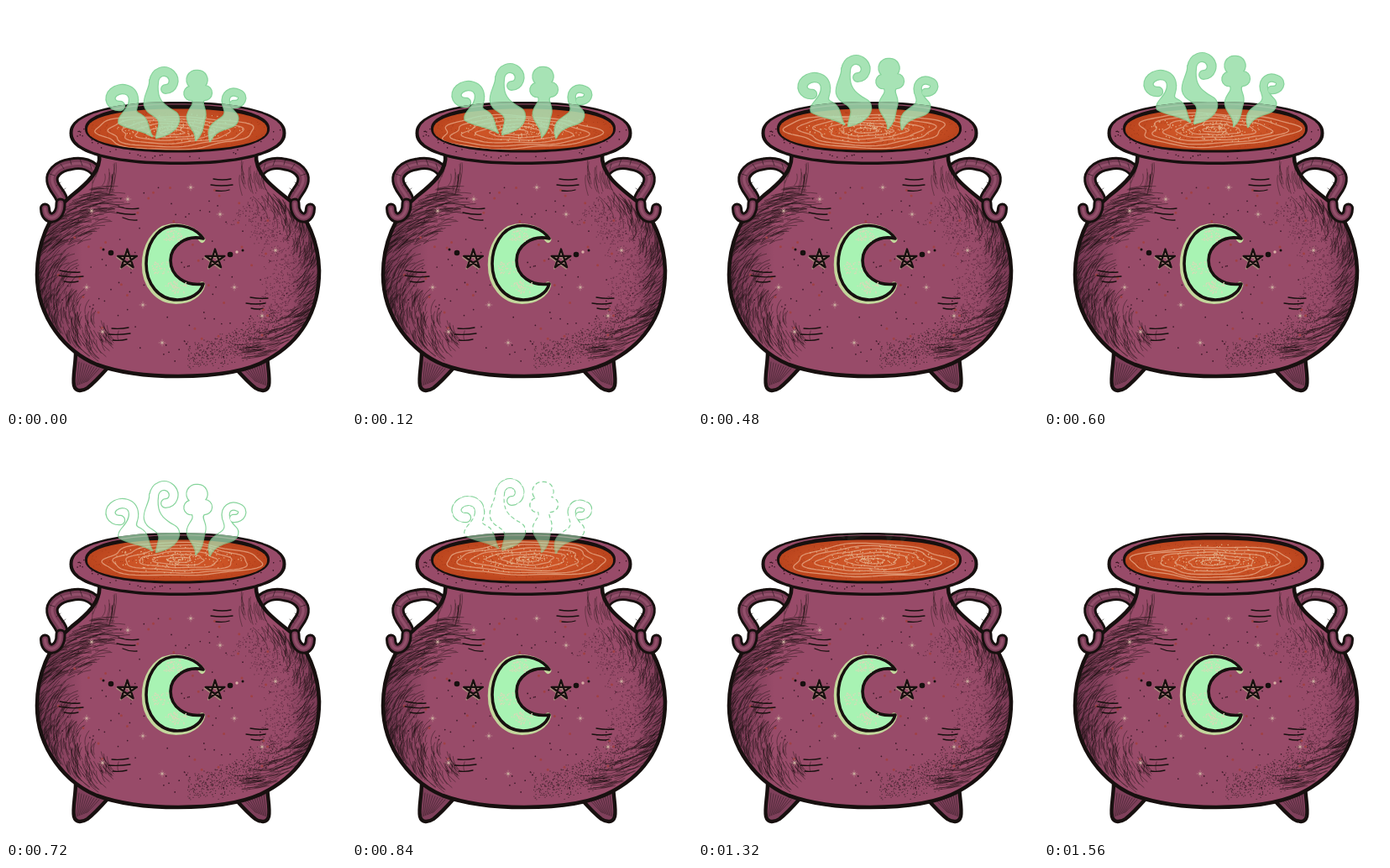
These frames come from a looping animation (405x480 px, 1680 ms). An HTML page:

```html
<!DOCTYPE html>
<html lang="en">
<head>
<meta charset="utf-8">
<title>Cauldron</title>
<style>
html, body { margin: 0; width: 100%; height: 100%; overflow: hidden; background: #fff; }
svg { display: block; width: 100vw; height: 100vh; }
path { stroke-linecap: round; stroke-linejoin: round; }
</style>
</head>
<body>
<svg id="stage" viewBox="0 0 405 480" xmlns="http://www.w3.org/2000/svg">
  <defs>
    <linearGradient id="shade" gradientUnits="userSpaceOnUse" x1="37" y1="0" x2="373" y2="0">
      <stop offset="0" stop-color="#4a2036" stop-opacity=".5"/>
      <stop offset=".16" stop-color="#4a2036" stop-opacity="0"/>
      <stop offset=".88" stop-color="#4a2036" stop-opacity="0"/>
      <stop offset="1" stop-color="#4a2036" stop-opacity=".4"/>
    </linearGradient>
    <radialGradient id="soupFill">
      <stop offset=".5" stop-color="#cd5426"/>
      <stop offset="1" stop-color="#bb451e"/>
    </radialGradient>
    <clipPath id="bodyClip"><path id="bodyCut"/></clipPath>
    <clipPath id="rimClip"><path id="rimCut"/></clipPath>
    <clipPath id="soupClip"><path id="soupCut"/></clipPath>
  </defs>
  <g id="airSteam"></g>
  <g id="pot"></g>
  <g id="soup" clip-path="url(#soupClip)"></g>
  <g clip-path="url(#rimClip)"><g id="potSteam"></g></g>
</svg>
<script>
const LOOP = 1680, STEP = 120, TAU = Math.PI * 2;
const INK = '#17100f', MAUVE = '#984b69';
const $ = id => document.getElementById(id);

let seed = 41;
const rnd = (a = 0, b = 1) => {
  seed = (seed * 16807) % 2147483647;
  return a + (b - a) * seed / 2147483647;
};
const times = (n, fn) => Array.from({ length: n }, (_, i) => fn(i)).join('');
const rad = deg => deg * Math.PI / 180;
const f = n => n.toFixed(1);
const dot = (x, y) => `M${f(x)} ${f(y)}h.01`;

function add(parent, d, attrs = {}) {
  const el = document.createElementNS('http://www.w3.org/2000/svg', 'path');
  el.setAttribute('d', d);
  for (const key in attrs) el.setAttribute(key, attrs[key]);
  parent.appendChild(el);
  return el;
}
const line = (parent, d, stroke, width, more) =>
  add(parent, d, { fill: 'none', stroke, 'stroke-width': width, ...more });

function superEllipse(cx, cy, a, b, n) {
  const pow = v => Math.sign(v) * Math.abs(v) ** (2 / n);
  return times(120, i => {
    const t = i / 120 * TAU;
    return `${i ? 'L' : 'M'}${f(cx + a * pow(Math.cos(t)))} ${f(cy + b * pow(Math.sin(t)))}`;
  }) + 'Z';
}

// ---- pot ----
const pot = $('pot');
const BODY = 'M111 176C114 196 96 212 78 226C50 248 37 285 37 320C37 372 72 412 108 427' +
  'C135 437 170 441 205 441C245 441 285 437 312 421C350 400 373 365 373 315' +
  'C372 280 358 250 340 233C318 216 296 200 298 176Z';
const MIRROR = { transform: 'matrix(-1 0 0 1 409 0)' };
const onBody = (deg, r) => [205 + 168 * r * Math.cos(rad(deg)), 318 + 122 * r * Math.sin(rad(deg))];

function tube(d, width, more) {
  line(pot, d, INK, width, more);
  line(pot, d, '#793c56', width - 6, more);
  line(pot, d, '#9c5873', 3.2, { 'stroke-opacity': .7, ...more });
}

function drawHandle(more) {
  tube('M112 204C104 187 88 186 77 188.5C60 191 54 201 55 208C56 219 68 224 68 238', 15.5, more);
  line(pot, 'M88 182l3 8M76 182l2 7M65 188l4 6M60 214l5 -4M66 221l5 -4M52 200l6 2M100 188l2 6', INK, .9,
    { 'stroke-opacity': .6, ...more });
}

function drawFoot(more) {
  add(pot, 'M83 412C83 428 79 442 81 452C83 460 91 459 97 455C106 448 114 439 122 430Z',
    { fill: '#7f405b', stroke: INK, 'stroke-width': 4.4, ...more });
  line(pot, times(9, i => `M${84 + i * 1.6} ${452 - i * .6}L${87 + i * 3} ${424 + i}`), INK, .7,
    { 'stroke-opacity': .6, ...more });
}

// short strokes along the edge, thinning out inwards
const hatch = (from, to, count, reach) => times(count, () => {
  const a = rnd(from, to), r = 1.03 - reach * rnd() ** 1.5, turn = rnd(4, 11), dip = rnd(.03, .09);
  const [x, y] = onBody(a, r), [p, q] = onBody(a + turn * .6, r - dip * .3), [u, v] = onBody(a + turn, r - dip);
  return `M${f(x)} ${f(y)}Q${f(p)} ${f(q)} ${f(u)} ${f(v)}`;
});

const stipple = (from, to, r0, r1, count) => times(count, () =>
  dot(...onBody(rnd(from, to), r0 + (r1 - r0) * (rnd() + rnd()) / 2)));

function drawBody() {
  add(pot, BODY, { fill: MAUVE });
  add(pot, BODY, { fill: 'url(#shade)' });
  const skin = document.createElementNS('http://www.w3.org/2000/svg', 'g');
  skin.setAttribute('clip-path', 'url(#bodyClip)');
  pot.appendChild(skin);

  line(skin, hatch(122, 234, 430, .27), INK, .7, { 'stroke-opacity': .6 });
  line(skin, hatch(-55, 52, 260, .15), INK, .7, { 'stroke-opacity': .6 });
  line(skin, stipple(28, 86, .66, .98, 620), INK, 1.3, { 'stroke-opacity': .55 });
  line(skin, stipple(-55, 32, .58, 1, 720), '#3f1a2b', 1.3, { 'stroke-opacity': .55 });
  for (const more of [{}, MIRROR])
    line(skin, times(18, () => {
      const x = rnd(100, 132), y = rnd(182, 208);
      return `M${f(x)} ${f(y)}q2 8 -3 ${f(rnd(12, 26))}`;
    }), INK, .7, { 'stroke-opacity': .55, ...more });

  const scatter = n => times(n, () => dot(...onBody(rnd(0, 360), .88 * Math.sqrt(rnd()))));
  line(skin, scatter(95), '#3c1828', 1.7);
  line(skin, scatter(38), '#a04145', 3);
  line(pot, BODY, INK, 4.6);

  line(pot, 'M134 239Q146 243 158 241M132 246Q146 249 154 248M139 252Q148 256 156 255' +
    'M247 206Q258 208 268 206M244 213Q256 215 270 213M250 220Q260 221 266 219' +
    'M64 315Q77 318 88 317M63 321Q78 324 92 322M69 328Q78 330 86 328' +
    'M291 347Q302 349 312 348M286 354Q298 356 309 354M292 360Q300 362 306 360' +
    'M126 384Q136 385 146 383M122 391Q135 392 148 390M127 398Q136 399 144 397', INK, 1.3);

  const glints = [[102, 244], [220, 216], [255, 248], [115, 388], [186, 401], [272, 335],
    [305, 369], [96, 335], [163, 356], [321, 291], [145, 230]];
  const rays = glints.map(([x, y]) =>
    `M${x - 4} ${y}h8M${x} ${y - 4}v8M${x - 2} ${y - 2}l4 4M${x + 2} ${y - 2}l-4 4`).join('');
  line(pot, rays, '#b37f86', .8);
  line(pot, glints.map(p => dot(...p)).join(''), '#c9ab9d', 3);
}

function drawEmblem() {
  const back = 'M235 277C226 264 209 260 197 262C178 265 167 286 167 307C167 331 182 350 204 350' +
    'C220 350 232 342 235 331';
  line(pot, back, '#c3d79c', 7.5, { transform: 'translate(-1.5 1.2)' });
  add(pot, back + 'C214 334 196 322 196 303C196 286 214 272 235 277Z',
    { fill: '#a8f3b3', stroke: INK, 'stroke-width': 3.6 });
  const flecks = (x, y, n) => times(n, () => dot(x + rnd(-9, 9) + rnd(-6, 6), y + rnd(-7, 7)));
  line(pot, flecks(200, 273, 50) + flecks(183, 312, 40) + flecks(202, 335, 60), '#dcd8b8', 1.5);

  const star = cx => times(5, i => {
    const a = rad(-90 + i * 144);
    return `${i ? 'L' : 'M'}${f(cx + 12 * Math.cos(a))} ${f(301.5 + 12 * Math.sin(a))}`;
  }) + 'Z';
  const stars = star(144.5) + star(249);
  line(pot, stars, '#a98a7c', 2, { transform: 'translate(-1 1.5)' });
  line(pot, stars, INK, 2.3);
  line(pot, dot(125, 294) + dot(267, 296), INK, 6.6);
  line(pot, dot(116, 290) + dot(282, 291), INK, 3);
  line(pot, dot(275, 293), '#d8b0a6', 3.4);
}

const RIM = superEllipse(204.5, 151.5, 129, 37.5, 2.25);
const SOUP = superEllipse(204, 147, 107, 24.5, 2.25);

function drawRim() {
  add(pot, RIM, { fill: INK });
  add(pot, superEllipse(204.5, 151, 125, 34.5, 2.25), { fill: MAUVE });
  add(pot, superEllipse(204, 146, 110, 28.5, 2.25), { fill: INK });
  line(pot, times(34, () => {
    const a = rad(rnd(-12, 192)), r = rnd(.9, 1.03);
    return dot(204.5 + 120 * r * Math.cos(a), 149.5 + 31.5 * r * Math.sin(a));
  }), '#34131f', 1.6);
  add(pot, SOUP, { fill: 'url(#soupFill)' });
}

$('bodyCut').setAttribute('d', BODY);
$('rimCut').setAttribute('d', RIM);
$('soupCut').setAttribute('d', SOUP);
drawFoot();
drawFoot({ transform: 'matrix(-1 0 0 1 394 0)' });
drawHandle();
drawHandle(MIRROR);
drawBody();
for (const more of [{}, MIRROR]) tube('M65 235C66 254 47 259 46.5 241', 13, more);
drawEmblem();
drawRim();

// ---- soup ----
line($('soup'), times(260, () => {
  const a = rnd(0, TAU), r = Math.sqrt(rnd());
  return dot(204 + 106 * r * Math.cos(a), 147 + 23 * r * Math.sin(a));
}), '#a63a18', 1.1);
const ripples = line($('soup'), '', '#df9470', 1.3);
const specks = line($('soup'), '', '#e3b48a', 1.4);
const flecks = Array.from({ length: 190 }, () => [rnd(0, TAU), rnd(.05, .85)]);

function drawSoup(turn) {
  const cx = 204 + 8 * Math.cos(turn + 2.4), cy = 148 + 2.5 * Math.sin(turn + 1.2);
  ripples.setAttribute('d', [14, 30, 46, 63, 79, 93].map((size, ring) =>
    times(80, i => {
      const a = i / 80 * TAU, w = a - turn;
      const r = size * (1 + .08 * Math.sin(3 * w + ring * .5) + .04 * Math.sin(7 * w + ring));
      return `${i ? 'L' : 'M'}${f(cx + r * Math.cos(a))} ${f(cy + r * .21 * Math.sin(a))}`;
    }) + 'Z').join(''));
  specks.setAttribute('d', flecks.map(([a, r]) =>
    dot(204 + 95 * r * Math.cos(a + turn), 145 + 20 * r * Math.sin(a + turn))).join(''));
}

// ---- steam ----
// each part: path, line width (0 for a filled shape)
const WISPS = [
  ['M136 111C125 112 121 101 128 95C136 88 152 90 152 104', 10],
  ['M157 103C158 114 150 117 160 121C171 127 168 138 174 147C163 139 146 139 135 132C131 123 147 117 147 104Z', 0],
  ['M190 91C199 91 203 80 196 73C189 67 178 70 176 82', 9.5],
  ['M171.5 80C172 90 163 100 165 110C167 120 177 121 181 127C185 133 180 139 179 149C189 147 204 141 206 129' +
    'C207 118 199 118 193 113C183 106 179 98 181 82Z', 0],
  ['M228 69a11 11 0 0 1 9 18a8.5 8.5 0 1 1 -1 17C231 108 240 115 237 125C234 133 236 142 226 152' +
    'C228 140 214 134 216 122C218 113 225 111 222 104a8 8 0 1 1 -3 -16a11 11 0 0 1 9 -19Z', 0],
  ['M271 109C281 110 285 99 277 96C268 92 260 97 262 108', 8],
  ['M258 105C258 114 264 118 258 124C252 129 243 132 242 142C241 147 243 150 243 153' +
    'C248 142 258 139 268 136C277 133 278 124 274 120C270 116 266 112 266 106Z', 0],
];

function makeSteam(parent) {
  const edges = WISPS.map(([d, w]) =>
    add(parent, d, { fill: 'none', stroke: '#86d49b', 'stroke-width': w ? w + 2.4 : 2.4 }));
  const cores = WISPS.map(([d, w]) => w
    ? line(parent, d, '#a7e3b5', w)
    : add(parent, d, { fill: '#a7e3b5' }));
  return { parent, edges, cores };
}
const air = makeSteam($('airSteam')), inner = makeSteam($('potSteam'));

function drawSteam(k) {
  const rise = k < 2 ? 8 - 4 * k : -3 * (k - 2);
  for (const s of [air, inner]) s.parent.setAttribute('transform', `translate(0 ${rise})`);
  inner.parent.setAttribute('opacity', Math.max(0, Math.min(.84, .84 - .13 * (k - 5))));

  // above the rim the fill drops out first, then its outline breaks up
  const fill = k < 6 ? '#a7e3b5' : '#fff';
  const dash = { 7: '3 5', 8: '.5 14', 9: '.1 45' }[k] || 'none';
  air.parent.setAttribute('visibility', k < 10 ? 'visible' : 'hidden');
  air.edges.forEach(el => el.setAttribute('stroke-dasharray', dash));
  air.cores.forEach((el, i) => el.setAttribute(WISPS[i][1] ? 'stroke' : 'fill', fill));
}

let last = -1;
function update(ms) {
  const k = Math.floor(ms % LOOP / STEP);
  if (k !== last) {
    last = k;
    drawSoup(k * STEP / LOOP * TAU);
    drawSteam(k);
  }
}

const start = performance.now();
function tick(now) {
  update(Math.max(0, now - start));
  requestAnimationFrame(tick);
}
update(0);
requestAnimationFrame(tick);
</script>
</body>
</html>
```
